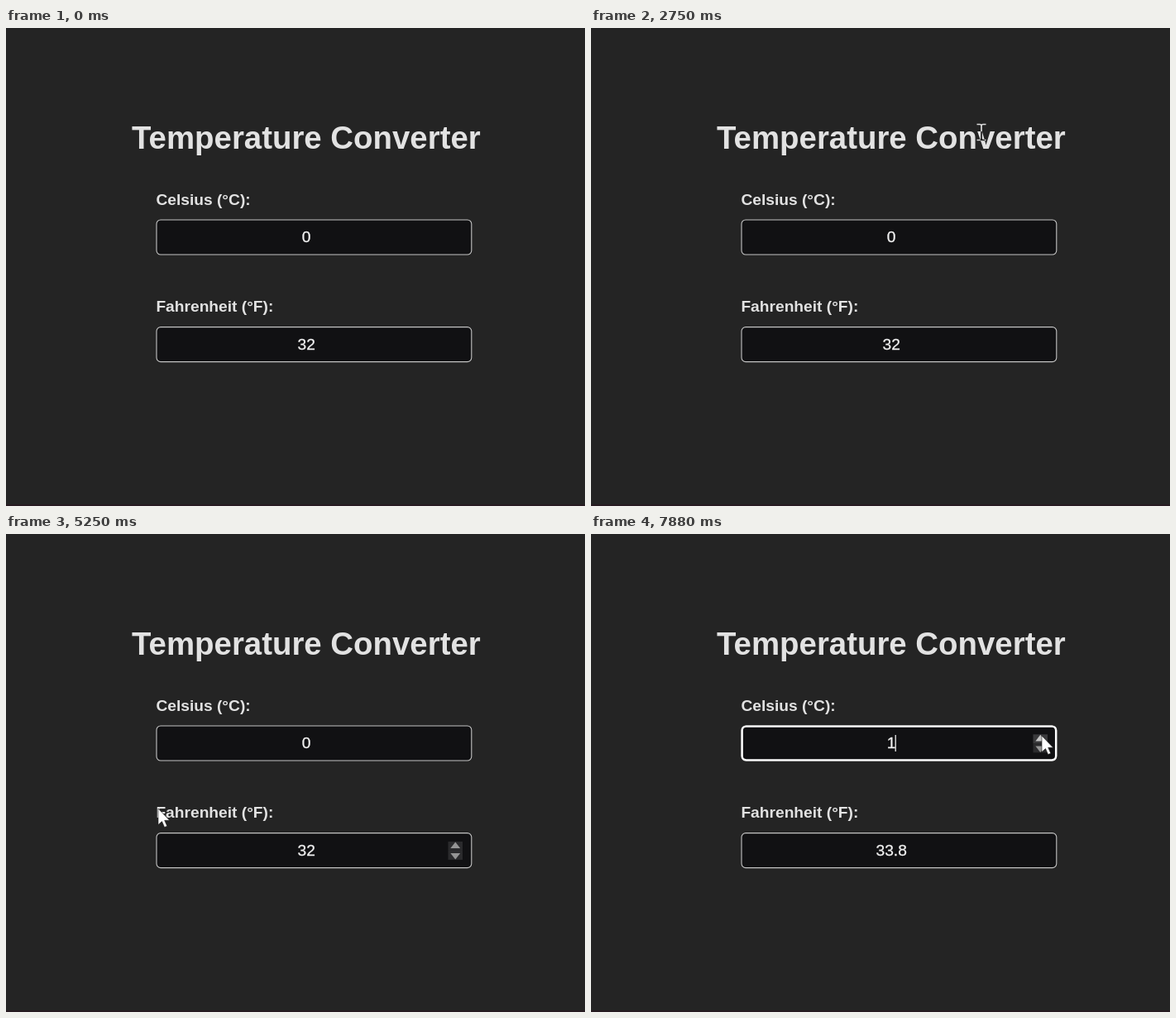
Animation of 700 by 578 pixels, one loop 8000 ms. Source, as an HTML page:

```html
<!DOCTYPE html>
<html lang="en">
<head>
<meta charset="utf-8">
<title>Temperature Converter</title>
<style>
  html, body { margin: 0; width: 100%; height: 100%; overflow: hidden; background: #242424; }
  svg { display: block; width: 700px; height: 578px; font: 19.2px "Liberation Sans", Arial, sans-serif; fill: #e2e2e2; }
  .title { font-size: 38.4px; font-weight: bold; }
  .label { font-weight: bold; }
  .value { text-anchor: middle; fill: #f2f2f2; stroke: #f2f2f2; stroke-width: .3; }
  .box { fill: #111113; stroke: #c4c4c4; stroke-width: 1.1; }
  .ring { fill: none; stroke: #fff; stroke-width: 2.3; }
  .ring, .caret, .spin { visibility: hidden; }
  .caret { fill: #fff; }
  .focus .ring, .focus .caret, .hover .spin { visibility: visible; }
  .spin rect { fill: #2b2b2d; }
  .spin path { fill: #959595; }
  .spin .lit rect { fill: #3a3a3c; }
  .spin .lit path { fill: #c6c6c6; }
  #arrow { fill: #fff; stroke: #1a1a1a; stroke-width: .6; }
  #beam { fill: none; stroke: #fff; stroke-width: 1.7; mix-blend-mode: difference; }
</style>
</head>
<body>
<svg viewBox="0 0 700 578">
  <rect width="700" height="578" fill="#242424"/>
  <rect y="576" width="700" height="2" fill="#271b21"/>
  <text class="title" x="152" y="146.4">Temperature Converter</text>
  <g id="fields"></g>
  <path id="arrow" d="M0 0V19.6L4.5 15.6L7.6 22.6L10.8 21.2L7.7 14.3H13.7Z"/>
  <path id="beam" d="M-5.5-9.5H-2Q0-9.5 0-7.5Q0-9.5 2-9.5H5.5M0-8V8M-5.5 9.5H-2Q0 9.5 0 7.5Q0 9.5 2 9.5H5.5"/>
</svg>
<script>
const LOOP = 8000, STEP = 125, CLICK = 60;

// Pointer: circles the page until the first key, then glides through [step, x, y]
const keys = [
  [13, 138, 144], [16, 340, 321], [19, 505, 150], [22, 472, 126],
  [24, 208, 140], [27, 549, 170], [29, 302, 199], [31, 250, 140],
  [34, 555, 270], [38, 151, 245], [40, 250, 240], [42, 184, 332],
  [45, 252, 333], [47, 231, 332], [49, 231, 332], [53, 538, 259], [57, 545, 244]
];

const $ = id => document.getElementById(id);
const arrow = $("arrow"), beam = $("beam");
const inside = (x, y, l, t, r, b) => x >= l && x <= r && y >= t && y <= b;

function orbit(step) {
  const a = 2.88 + (step - keys[0][0]) * 2 * Math.PI / 5.6;
  return [344 + 213 * Math.cos(a), 185 - 160 * Math.sin(a)];
}

// Slope that never overshoots: flat at turning points
function slope(i, axis) {
  if (i < 1 || i > keys.length - 2) return 0;
  const [p, q, r] = keys.slice(i - 1, i + 2);
  const a = (q[axis] - p[axis]) / (q[0] - p[0]);
  const b = (r[axis] - q[axis]) / (r[0] - q[0]);
  return a * b > 0 ? 2 * a * b / (a + b) : 0;
}

function pointer(step) {
  if (step < keys[0][0]) return orbit(step);
  const next = keys.findIndex(k => k[0] > step);
  if (next < 0) return keys.at(-1).slice(1);
  const p = keys[next - 1], q = keys[next];
  const span = q[0] - p[0], u = (step - p[0]) / span, v = 1 - u;
  return [1, 2].map(axis =>
    p[axis] * v * v * (1 + 2 * u) + q[axis] * u * u * (3 - 2 * u) +
    span * u * v * (slope(next - 1, axis) * v - slope(next, axis) * u));
}

function field(label, top) {
  const g = document.createElementNS("http://www.w3.org/2000/svg", "g");
  g.innerHTML = `
    <text class="label" x="181.4" y="${top - 18.5}">${label}</text>
    <rect class="box" x="182" y="${top}" width="380.8" height="42" rx="5"/>
    <rect class="ring" x="182.7" y="${top + .7}" width="379.4" height="40.6" rx="5"/>
    <text class="value" x="363.2" y="${top + 27}"></text>
    <rect class="caret" x="367.6" y="${top + 11}" width="1.2" height="20"/>
    <g class="spin">
      <g><rect x="534.5" y="${top + 10.3}" width="17.5" height="11"/>
        <path d="M543.3 ${top + 10.8}l5.9 7.6h-11.8z"/></g>
      <g><rect x="534.5" y="${top + 21.3}" width="17.5" height="11"/>
        <path d="M543.3 ${top + 32}l5.9-7.6h-11.8z"/></g>
    </g>`;
  $("fields").append(g);
  return { g, top, value: g.querySelector(".value"), buttons: g.querySelectorAll(".spin > g") };
}

const celsius = field("Celsius (°C):", 232);
const fahrenheit = field("Fahrenheit (°F):", 361.6);

function draw(t) {
  const step = Math.floor((t + 5) / STEP);
  const shown = step > 0;
  const [x, y] = shown ? pointer(step) : [-50, -50];
  const clicked = step >= CLICK;
  let text = inside(x, y, 152, 112, 573, 155);

  for (const { g, top, buttons } of [celsius, fahrenheit]) {
    const onSpin = inside(x, y, 534, top + 10, 552, top + 33);
    const upper = y < top + 21.5;
    g.classList.toggle("hover", inside(x, y, 182, top - 37, 563, top + 42));
    buttons[0].classList.toggle("lit", onSpin && upper);
    buttons[1].classList.toggle("lit", onSpin && !upper);
    if (inside(x, y, 182, top, 563, top + 42) && !onSpin) text = true;
  }

  const degrees = clicked ? 1 : 0;
  celsius.g.classList.toggle("focus", clicked);
  celsius.value.textContent = degrees;
  fahrenheit.value.textContent = degrees * 1.8 + 32;

  for (const [el, on] of [[arrow, !text], [beam, text]]) {
    el.style.visibility = shown && on ? "visible" : "hidden";
    el.setAttribute("transform", `translate(${x} ${y})`);
  }
}

const start = performance.now();
function tick() {
  draw((performance.now() - start) % LOOP);
  requestAnimationFrame(tick);
}
draw(0);
requestAnimationFrame(tick);
</script>
</body>
</html>
```
